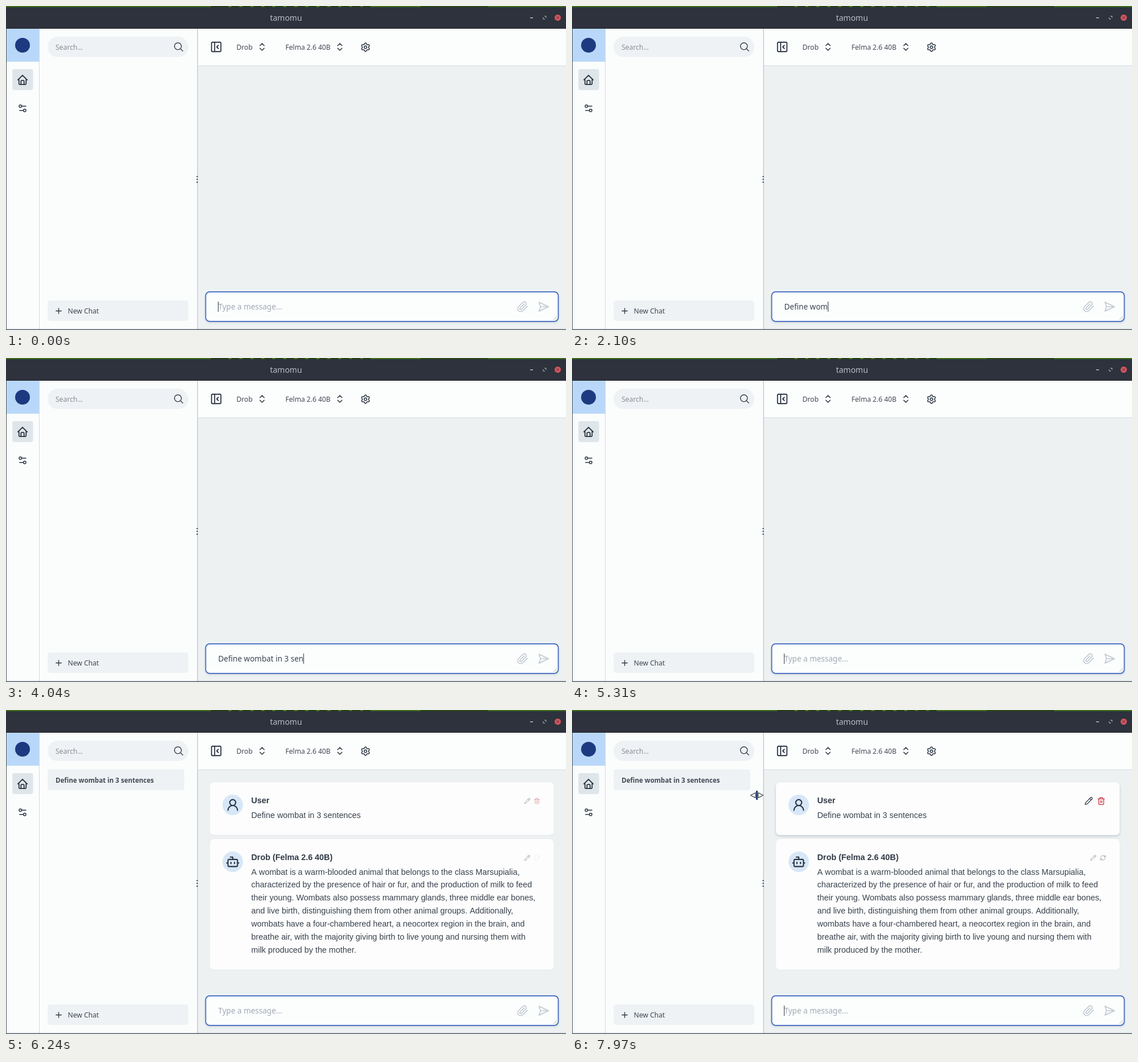
An HTML page with a canvas that plays this animation: 983x570 px, repeating every 8 s.

```html
<!DOCTYPE html>
<html lang="en">
<head>
<meta charset="utf-8">
<title>Chat window</title>
<style>
  html, body { margin: 0; width: 100%; height: 100%; overflow: hidden; background: #edf1f2; }
  canvas { display: block; width: 983px; height: 570px; }
</style>
</head>
<body>
<canvas id="stage" width="983" height="570"></canvas>
<script>
const ctx = document.getElementById('stage').getContext('2d');
const LOOP = 8000;
const UI = '"Noto Sans", sans-serif';
const BODY = '"Liberation Sans", Arial, sans-serif';
const INK = '#2c3543';

const PROMPT = 'Define wombat in 3 sentences';
const PROVIDER = 'Drob';
const MODEL = 'Felma 2.6 40B';
const ANSWER = [
  'A wombat is a warm-blooded animal that belongs to the class Marsupialia,',
  'characterized by the presence of hair or fur, and the production of milk to feed',
  'their young. Wombats also possess mammary glands, three middle ear bones,',
  'and live birth, distinguishing them from other animal groups. Additionally,',
  'wombats have a four-chambered heart, a neocortex region in the brain, and',
  'breathe air, with the majority giving birth to live young and nursing them with',
  'milk produced by the mother.'
];

// When each character of the prompt is typed
const KEYS = [1070, 1230, 1300, 1370, 1450, 1530, 1600, 1770, 1970, 2100, 2300, 2500, 2600,
  2770, 3000, 3070, 3140, 3400, 3600, 3740, 3840, 4000, 4440, 4600, 4700, 4800, 4900, 5010];
const SENT = 5310;

// Pointer: time, x, y
const PATH = [[6840, 592, 564], [6970, 568, 440], [7110, 546, 330], [7270, 546, 330],
  [7370, 520.5, 199.5], [7460, 505, 178], [7540, 499, 173], [7870, 499, 173], [7970, 324.5, 150]];

// Icons on a 24 unit grid
const circle = (x, y, r) => `M${x - r} ${y}a${r} ${r} 0 1 0 ${2 * r} 0a${r} ${r} 0 1 0 ${-2 * r} 0`;

function gearPath() {
  let d = '';
  for (let i = 0; i < 72; i++) {
    const a = i / 72 * Math.PI * 2 - Math.PI / 2;
    const r = 8.6 + 1.5 * Math.cos(6 * (a + Math.PI / 2));
    d += `${i ? 'L' : 'M'}${12 + r * Math.cos(a)} ${12 + r * Math.sin(a)}`;
  }
  return d + 'Z' + circle(12, 12, 3);
}

const ICONS = {
  search: circle(10.5, 10.5, 7.5) + 'M21 21l-5.2-5.2',
  home: 'M5 12H3l9-9 9 9h-2M5 12v7a2 2 0 0 0 2 2h10a2 2 0 0 0 2-2v-7M9 21v-6a2 2 0 0 1 2-2h2a2 2 0 0 1 2 2v6',
  sliders: 'M20 7h-9M14 17H5' + circle(17, 17, 3) + circle(7, 7, 3),
  panel: 'M5 3h14a2 2 0 0 1 2 2v14a2 2 0 0 1-2 2H5a2 2 0 0 1-2-2V5a2 2 0 0 1 2-2zM9 3v18M16 15l-3-3 3-3',
  chevrons: 'M7 15l5 5 5-5M7 9l5-5 5 5',
  gear: gearPath(),
  plus: 'M5 12h14M12 5v14',
  clip: 'M21.4 11l-9.2 9.2a6 6 0 0 1-8.5-8.5l8.6-8.5A4 4 0 1 1 18 8.8l-8.6 8.6a2 2 0 0 1-2.8-2.8l8.5-8.5',
  send: 'M3 3l3 9-3 9 19-9ZM6 12h16',
  user: circle(12, 8, 5) + 'M20 21a8 8 0 0 0-16 0',
  bot: 'M12 8V4H8M6 8h12a2 2 0 0 1 2 2v8a2 2 0 0 1-2 2H6a2 2 0 0 1-2-2v-8a2 2 0 0 1 2-2zM2 14h2M20 14h2M15 13v2M9 13v2',
  pencil: 'M21.2 6.8a1 1 0 0 0-4-4L3.8 16.2a2 2 0 0 0-.5.8L2 21.4a.5.5 0 0 0 .6.6L7 20.7a2 2 0 0 0 .8-.5zM15 5l4 4',
  trash: 'M3 6h18M19 6v14c0 1-1 2-2 2H7c-1 0-2-1-2-2V6M8 6V4c0-1 1-2 2-2h4c1 0 2 1 2 2v2M10 11v6M14 11v6',
  refresh: 'M3 12a9 9 0 0 1 9-9 9.8 9.8 0 0 1 6.7 2.7L21 8M21 3v5h-5M21 12a9 9 0 0 1-9 9 9.8 9.8 0 0 1-6.7-2.7L3 16M8 16H3v5'
};
for (const k in ICONS) ICONS[k] = new Path2D(ICONS[k]);

const mix = (a, b, p) => a + (b - a) * p;
const ramp = (t, a, b) => Math.min(1, Math.max(0, (t - a) / (b - a)));

function rect(x, y, w, h, fill) {
  ctx.fillStyle = fill;
  ctx.fillRect(x, y, w, h);
}

function box(x, y, w, h, r, fill, stroke, line = 1) {
  ctx.beginPath();
  ctx.roundRect(x, y, w, h, r);
  ctx.fillStyle = fill;
  ctx.fill();
  if (!stroke) return;
  ctx.strokeStyle = stroke;
  ctx.lineWidth = line;
  ctx.stroke();
}

function shadowed(alpha, blur, dy, draw) {
  ctx.save();
  ctx.shadowColor = `rgba(40, 55, 75, ${alpha})`;
  ctx.shadowBlur = blur;
  ctx.shadowOffsetY = dy;
  draw();
  ctx.restore();
}

function disc(x, y, r, fill) {
  ctx.beginPath();
  ctx.arc(x, y, r, 0, Math.PI * 2);
  ctx.fillStyle = fill;
  ctx.fill();
}

function text(str, x, y, font, fill, align = 'left') {
  ctx.font = font;
  ctx.fillStyle = fill;
  ctx.textAlign = align;
  ctx.fillText(str, x, y);
}

function icon(name, cx, cy, size, color, weight = 2) {
  ctx.save();
  ctx.translate(cx - size / 2, cy - size / 2);
  ctx.scale(size / 24, size / 24);
  ctx.lineCap = ctx.lineJoin = 'round';
  ctx.lineWidth = weight;
  ctx.strokeStyle = color;
  ctx.stroke(ICONS[name]);
  ctx.restore();
}

function fade(alpha, draw) {
  if (alpha <= 0) return;
  ctx.save();
  ctx.globalAlpha *= alpha;
  draw();
  ctx.restore();
}

function titleBar() {
  rect(0, 0, 983, 3, '#3f701d');
  rect(360, 0, 280, 2, '#263f1a');
  for (let i = 0; i < 24; i++) rect(390 + i * 19.3 % 250, 0, 5, 1.5, '#4f8426');
  rect(728, 0, 118, 2, '#2b481b');
  rect(0, 2, 983, 38, '#2d323c');
  rect(0, 39, 983, 1, '#252a32');
  text('tamomu', 491.5, 25.5, '14px ' + UI, '#b6bcc5', 'center');
  rect(920, 20, 5, 1.4, '#c3c8d0');
  ctx.strokeStyle = '#b9bfc8';
  ctx.lineWidth = 1;
  ctx.beginPath();
  ctx.moveTo(945, 18); ctx.lineTo(948, 18); ctx.lineTo(948, 21);
  ctx.moveTo(943, 20); ctx.lineTo(943, 23); ctx.lineTo(946, 23);
  ctx.stroke();
  disc(968.5, 20.5, 5.5, '#d4545e');
  ctx.strokeStyle = '#4a2a33';
  ctx.beginPath();
  ctx.moveTo(966.5, 18.5); ctx.lineTo(970.5, 22.5);
  ctx.moveTo(970.5, 18.5); ctx.lineTo(966.5, 22.5);
  ctx.stroke();
}

function sidebar() {
  rect(0, 40, 336, 530, '#fbfdfd');
  rect(1, 40, 57, 58, '#b9d8f9');
  disc(29, 69, 13, '#1d3a80');
  box(11, 111, 36.5, 37, 4, '#dfe6ea');
  icon('home', 29, 130, 21.5, INK);
  icon('sliders', 29, 180, 18, INK);
  rect(58, 40, 1, 530, '#d1d8e6');
  box(73, 54, 247, 36, 18, '#eff2f4');
  text('Search...', 87, 76.5, '12.05px ' + UI, '#868d97');
  icon('search', 303, 72, 19.5, '#3a4350', 1.8);
  box(73, 518, 247, 36, 5, '#eff2f4');
  icon('plus', 92.5, 536.5, 16, INK);
  text('New Chat', 108.5, 541, '12.1px ' + UI, '#3b4451');
}

function mainArea() {
  rect(337, 105, 646, 465, '#edf1f2');
  rect(337, 40, 646, 65, '#fcfdfd');
  rect(337, 104.5, 646, 1, '#d3dbe8');
  rect(335.5, 40, 1.2, 530, '#c6ccd5');
  for (let i = -1; i < 2; i++) rect(334.5, 304 + i * 5, 2, 2, '#39414d');
  icon('panel', 369, 72, 22, INK);
  text(PROVIDER, 404.5, 76.5, '12.1px ' + UI, '#3f4855');
  icon('chevrons', 449.5, 72, 18, INK);
  text(MODEL, 490.5, 76.5, '12.05px ' + UI, '#3f4855');
  icon('chevrons', 586, 72, 18, INK);
  icon('gear', 631, 72.5, 18, INK);
}

// Small pale buttons that grow and darken while the card is hovered
function cardTools(y, second, color, hover, reveal) {
  const size = mix(11, 15, hover);
  fade(mix(0.45, 1, hover), () => {
    icon('pencil', mix(915, 907, hover), y, size, INK);
    fade(reveal, () => icon(second, mix(932, 929, hover), y, size, color));
  });
}

function card(y, h, avatar, title, lines, hover) {
  shadowed(mix(0.07, 0.2, hover), mix(2, 4, hover), mix(0.5, 2, hover), () =>
    box(358, y, 603.5, h, 7, '#fcfdfc'));
  disc(398, y + 40, 18, '#d7e7f8');
  icon(avatar, 398, y + 40, 25, INK);
  text(title, 430.5, y + 36.5, 'bold 14.35px ' + BODY, '#313a47');
  lines.forEach((line, i) =>
    text(line, 430.5, y + 62.5 + i * 22.92, '14.35px ' + BODY, '#3a424e'));
}

function conversation(t) {
  const toUser = ramp(t, 7390, 7540);
  const overBot = ramp(t, 6960, 7110) * (1 - toUser);
  fade(ramp(t, SENT + 20, 5370), () => {
    box(73, 104.5, 240, 36.5, 4, '#eff2f4');
    text(PROMPT, 87, 128, 'bold 11.5px ' + UI, '#414a57');
    card(127, 93, 'user', 'User', [PROMPT], toUser);
    cardTools(160, 'trash', '#c9303c', toUser, 1);
  });
  fade(ramp(t, 5880, 6040), () => {
    card(227, 230, 'bot', `${PROVIDER} (${MODEL})`, ANSWER, overBot);
    cardTools(260, 'refresh', INK, overBot, mix(0.12, 1, ramp(t, 6240, 6370)));
  });
}

function caretOn(t) {
  if (t < KEYS[0]) return t < 500;
  if (t < SENT) return true;
  return (t - SENT) % 1200 < 600;
}

function messageBox(t) {
  shadowed(0.14, 4, 2, () => box(350, 502, 620, 53, 7, '#fcfefe'));
  box(350.5, 502.8, 619, 52.1, 7, '#fcfefe', '#3c66bf', 1.7);
  const typed = t < SENT ? PROMPT.slice(0, KEYS.filter(k => k <= t).length) : '';
  const font = '13.5px ' + UI;
  text(typed || 'Type a message...', 372.5, 534, font, typed ? '#3d4551' : '#a3a9b3');
  if (caretOn(t)) {
    ctx.font = font;
    rect(Math.round(372.3 + ctx.measureText(typed).width), 520, 1, 18, '#2f3743');
  }
  icon('clip', 907, 529, 21, '#c3cad3', 1.9);
  icon('send', 943.5, 529, 21, '#c3cad3', 1.9);
  ctx.strokeStyle = '#9aa5b5';
  ctx.lineWidth = 0.8;
  ctx.beginPath();
  ctx.moveTo(961, 552); ctx.lineTo(967, 546);
  ctx.moveTo(964.5, 552); ctx.lineTo(967, 549.5);
  ctx.stroke();
}

function polygon(points) {
  ctx.beginPath();
  points.forEach(([x, y]) => ctx.lineTo(x, y));
  ctx.closePath();
  ctx.fill();
  ctx.stroke();
}

function pointer(t) {
  if (t < PATH[0][0]) return;
  let i = 1;
  while (i < PATH.length - 1 && PATH[i][0] < t) i++;
  const [t0, x0, y0] = PATH[i - 1], [t1, x1, y1] = PATH[i];
  const p = ramp(t, t0, t1), x = mix(x0, x1, p);
  ctx.save();
  ctx.translate(x, mix(y0, y1, p));
  ctx.lineJoin = 'round';
  ctx.lineWidth = 1.1;
  ctx.fillStyle = '#fbfcfd';
  ctx.strokeStyle = '#343b46';
  if (x < 340) {
    for (const s of [-1, 1]) polygon([[s * 11, 0], [s * 2.5, -4.5], [s * 2.5, 4.5]]);
    rect(-1.5, -8, 3, 16, '#24406f');
  } else {
    polygon([[0.5, 0.5], [9, 8.5], [7, 13.5], [0.5, 14.5]]);
  }
  ctx.restore();
}

function render(t) {
  titleBar();
  sidebar();
  mainArea();
  conversation(t);
  messageBox(t);
  rect(0, 40, 1, 530, '#4b525c');
  rect(0, 568.5, 983, 1.5, '#59616b');
  pointer(t);
}

const start = performance.now();
function tick() {
  render((performance.now() - start) % LOOP);
  requestAnimationFrame(tick);
}
tick();
</script>
</body>
</html>
```
